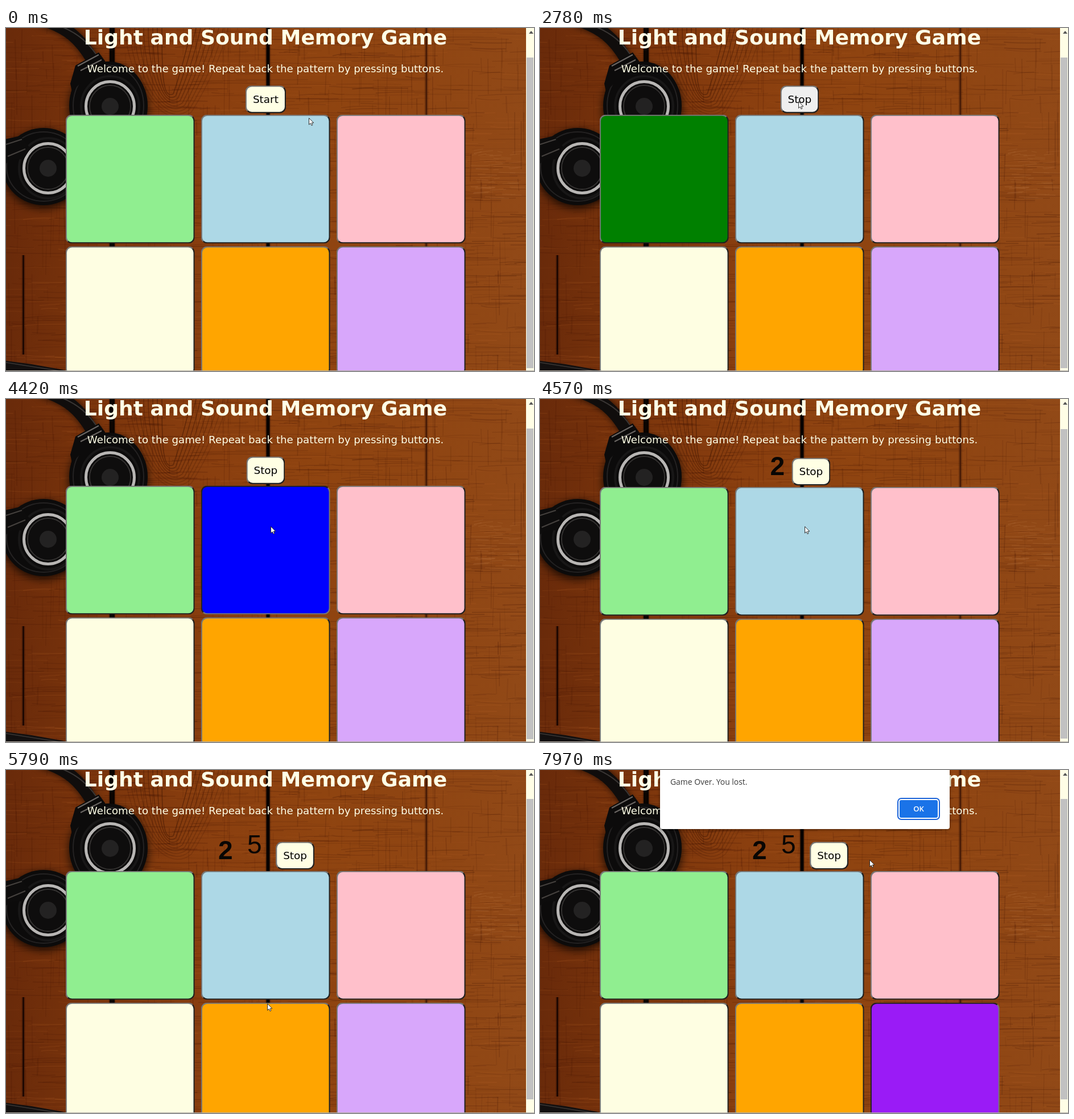
Animation, 928 px wide and 604 px high, one loop 8000 ms. Source, as an HTML page with a canvas:

```html
<!DOCTYPE html>
<html lang="en">
<head>
<meta charset="utf-8">
<title>Light and Sound Memory Game</title>
<style>
html, body { margin: 0; width: 100%; height: 100%; overflow: hidden; }
body { position: relative; background: #8a400f; font-family: "DejaVu Sans", sans-serif; }
body > * { position: absolute; left: 0; top: 0; }
.line { white-space: nowrap; width: 912px; text-align: center; color: #ffffe6; line-height: 1; }
h1.line { margin: 0; font-size: 36.1px; top: -1.2px; }
p.line { margin: 0; font-size: 18.2px; top: 63px; }
.box { box-sizing: border-box; border: 2px outset #767676; border-radius: 10px; transform-origin: 0 0; }
.box.in { border-style: inset; }
.tile { width: 200px; height: 200px; }
#btn { height: 42.5px; font-size: 16.2px; line-height: 40.6px; text-align: center; color: #000; }
.num { font: 46px/46px "Liberation Sans", Arial, sans-serif; color: #080604; }
#two { font-weight: bold; }
#bar { left: 914px; width: 14px; height: 604px; background: #fffee6; }
#thumb { position: absolute; left: 1px; width: 12px; background: #c1c1c1; }
#bar i { position: absolute; left: 4.5px; top: 5px; border: 4px solid transparent; border-top: 0; border-bottom: 5px solid #555; }
#foot { top: 603px; width: 928px; height: 1px; background: #b5aea6; }
#dialog { left: 211px; width: 509px; height: 104px; background: #fff; border-radius: 0 0 4px 4px;
  box-shadow: 0 1px 5px rgba(0,0,0,.45); font-family: "Open Sans", sans-serif; }
#dialog span { position: absolute; left: 18px; top: 11px; font-size: 13.9px; line-height: 20px; color: #3a3a3a; white-space: nowrap; }
#dialog b { position: absolute; left: 421px; top: 53px; width: 67px; height: 31px; border-radius: 3px; background: #1a73e8;
  box-shadow: 0 0 0 2px #fff, 0 0 0 4px #1a62d8; color: #fff; font-size: 13px; font-weight: 600; line-height: 31px; text-align: center; }
</style>
</head>
<body>
<canvas id="wood" width="928" height="604"></canvas>
<h1 class="line">Light and Sound Memory Game</h1>
<p class="line">Welcome to the game! Repeat back the pattern by pressing buttons.</p>
<div class="num" id="two">2</div>
<div class="num" id="five">5</div>
<div class="box" id="btn">Start</div>
<div id="bar"><i></i><div id="thumb"></div></div>
<div id="foot"></div>
<div id="dialog"><span>Game Over. You lost.</span><b>OK</b></div>
<svg id="cursor" width="12" height="18"><path d="M.5.6V12.2L3.2 9.7 5 13.6 6.9 12.8 5.2 9H8.8Z" fill="#fff" stroke="#1c1c1c" stroke-width=".9"/></svg>
<script>
const $ = id => document.getElementById(id);
const SCALE = 1.136, LOOP = 8000;

// --- Backdrop ---
const g = $('wood').getContext('2d');
let seed = 11;
const rnd = () => (seed = (seed * 16807) % 2147483647) / 2147483647;
const span = (a, b) => a + (b - a) * rnd();

function ramp(x0, y0, x1, y1, ...stops) {
  const r = g.createLinearGradient(x0, y0, x1, y1);
  stops.forEach((c, i) => r.addColorStop(i / (stops.length - 1), c));
  return r;
}
function stroke(color, width, path) {
  g.strokeStyle = color;
  g.lineWidth = width;
  g.beginPath();
  path();
  g.stroke();
}
function oval(x, y, rx, ry, color, line) {
  g.beginPath();
  g.ellipse(x, y, rx, ry, 0, 0, 7);
  if (line) { g.strokeStyle = color; g.lineWidth = line; g.stroke(); }
  else { g.fillStyle = color; g.fill(); }
}
function poly(color, ...pts) {
  g.fillStyle = color;
  g.beginPath();
  for (let i = 0; i < pts.length; i += 2) g.lineTo(pts[i], pts[i + 1]);
  g.fill();
}

function drawWood() {
  g.fillStyle = ramp(0, 0, 914, 0, '#692a0a', '#7d360c', '#8a3f0f', '#8f4410', '#8f4512', '#914917');
  g.fillRect(0, 0, 928, 604);
  // fine horizontal grain
  for (let i = 0; i < 1500; i++) {
    const x = span(-60, 900), y = span(0, 604), w = span(20, 130), d = span(-5, 5);
    const tone = rnd() < .7 ? '66,20,2' : '172,92,36';
    stroke(`rgba(${tone},${span(.06, .28)})`, span(.6, 1.8), () => {
      g.moveTo(x, y);
      g.quadraticCurveTo(x + w / 2, y + d, x + w, y + d / 2);
    });
  }
  // saw marks across the grain
  for (let i = 0; i < 420; i++) {
    const x = span(0, 914), y = span(-40, 604), h = span(15, 90);
    stroke(`rgba(60,16,0,${span(.05, .22)})`, span(.8, 2.2), () => {
      g.moveTo(x, y);
      g.lineTo(x + span(-2, 2), y + h);
    });
  }
  // knot with arches around it
  for (let i = 0; i < 9; i++) {
    const r = 8 + i * 8;
    stroke(`rgba(62,20,2,${.5 - i * .04})`, 1.5, () => {
      g.moveTo(282 - r, 0);
      g.bezierCurveTo(282 - r, 80, 275, 118 + r, 290 + r * .5, 112 + r * .5);
      g.quadraticCurveTo(302 + r, 70, 318 + r, 0);
    });
  }
  for (let i = 0; i < 55; i++) {
    const x = span(812, 890), y = span(215, 300);
    stroke(`rgba(176,108,56,${span(.15, .4)})`, 1.3, () => {
      g.moveTo(x, y);
      g.lineTo(x + span(8, 35), y + span(-3, 3));
    });
  }
  // gaps between planks
  for (const [x, w, y, c] of [[457.5, 6, 0, '#080301'], [182, 9, 0, '#0b0401'], [737.5, 2.5, 0, '#461a06'], [29, 3, 400, '#1f0802']]) {
    const h = y ? 175 : 604;
    g.fillStyle = 'rgba(40,10,0,.22)';
    g.fillRect(x - 2, y, w + 4, h);
    g.fillStyle = c;
    g.fillRect(x, y, w, h);
  }
}

function cup(x, y, rx, ry, ringX, ringY) {
  g.save();
  g.shadowColor = 'rgba(0,0,0,.8)';
  g.shadowBlur = 16;
  g.shadowOffsetY = 5;
  oval(x, y, rx, ry, '#0c0b0b');
  g.restore();
  oval(x, y, rx - 7, ry - 7, '#242222', 2);
  oval(ringX, ringY, 51, 53, '#181717', 4);
  oval(ringX, ringY, 42.5, 43.5, '#b8b6b4', 5);
  oval(ringX, ringY, 36, 37, '#353332', 2);
  oval(ringX, ringY, 35, 36, '#0e0d0d');
  oval(ringX, ringY, 15, 15, '#232222');
}

function drawHeadphones() {
  g.save();
  g.lineCap = 'round';
  g.shadowColor = 'rgba(0,0,0,.7)';
  g.shadowBlur = 12;
  stroke('#100d0c', 22, () => { g.moveTo(66, -14); g.bezierCurveTo(108, 0, 130, 18, 152, 56); });
  g.restore();
  stroke('#3a3634', 2, () => { g.moveTo(90, -5); g.quadraticCurveTo(134, 10, 158, 46); });
  cup(180, 137, 69, 78, 183, 138);
  poly('#0c0b0b', 122, 66, 163, 43, 174, 58, 172, 75, 134, 94, 116, 112, 113, 98);
  stroke('#6a6663', 2, () => { g.moveTo(126, 67); g.lineTo(163, 47); g.moveTo(131, 75); g.lineTo(168, 56); });
  cup(66, 244, 72, 68, 74, 247);
  poly('#0d0c0c', -2, 196, 25, 190, 43, 212, 31, 231, 10, 232, -2, 240);
  stroke('#45413e', 2, () => { g.moveTo(0, 205); g.lineTo(28, 196); g.moveTo(3, 226); g.lineTo(34, 213); });
  poly('#131010', 0, 586, 45, 592, 112, 604, 0, 604);
  stroke('#3a3634', 1.5, () => { g.moveTo(0, 589); g.lineTo(95, 604); });
}
drawWood();
drawHeadphones();

// --- Tiles ---
const COLORS = ['#90ee90', '#add8e6', '#ffc0cb', '#fefee2', '#ffa500', '#d8a7fb'];
const tiles = COLORS.map(c => {
  const el = document.createElement('div');
  el.className = 'box tile';
  el.style.background = c;
  document.body.insertBefore(el, $('bar'));
  return el;
});
// tile, lit colour, from, to, pressed by the pointer
const FLASHES = [
  [0, '#008000', 2780, 3740, false],
  [1, '#0000ff', 4420, 4570, true],
  [4, '#ff7f00', 5420, 5790, true],
  [5, '#9a1bf6', 7050, LOOP, true]
];

// --- Timeline: [time, ...values], each held until the next ---
const POINTER = [
  [0, 532, 158], [530, 521, 148], [650, 490, 124], [770, 461, 113], [890, 454, 129],
  [4140, 465, 224], [5000, 464, 300], [5120, 459, 390], [5270, 459, 411],
  [6100, 490, 416], [6250, 565, 458], [6370, 620, 490],
  [7700, 594, 365], [7820, 574, 252], [7970, 579, 158]
];
// shift of the board, button centre, thumb top and bottom
const LAYOUT = [[0, 0, 456.4, 52, 599], [4570, 2.2, 476.4, 53, 598], [5790, 25.1, 508.1, 51, 580]];
const FADE = [[0, 0], [7200, .4], [7330, .8], [7450, 1]];
const at = (keys, t) => keys.filter(k => k[0] <= t).pop().slice(1);

function place(el, x, y, scale = 1) {
  el.style.transform = `translate(${x}px,${y}px) scale(${scale})`;
}

function frame() {
  const t = performance.now() % LOOP;
  const [shift, mid, top, bottom] = at(LAYOUT, t);

  tiles.forEach((el, i) => {
    const hit = FLASHES.find(f => f[0] === i && t >= f[2] && t < f[3]);
    el.style.background = hit ? hit[1] : COLORS[i];
    el.classList.toggle('in', !!hit && hit[4]);
    place(el, 104.6 + i % 3 * 238, 152.4 + shift + (i > 2 ? 231.9 : 0), SCALE);
  });

  const started = t >= 1730, width = started ? 60 : 63;
  const btn = $('btn');
  btn.textContent = started ? 'Stop' : 'Start';
  btn.style.width = width + 'px';
  btn.style.background = t >= 890 && t < 4140 ? '#efefef' : '#ffffe4';
  btn.classList.toggle('in', t >= 1480 && !started);
  place(btn, mid - width * SCALE / 2, 101.2 + shift, SCALE);

  const second = t >= 5790;
  $('two').style.visibility = t >= 4570 ? 'visible' : 'hidden';
  $('five').style.visibility = second ? 'visible' : 'hidden';
  place($('two'), second ? 373 : 404.6, second ? 118 : 95);
  place($('five'), 424, 108);

  $('thumb').style.top = top + 'px';
  $('thumb').style.height = bottom - top + 'px';
  $('dialog').style.opacity = at(FADE, t)[0];
  place($('cursor'), ...at(POINTER, t));
  requestAnimationFrame(frame);
}
frame();
</script>
</body>
</html>
```
